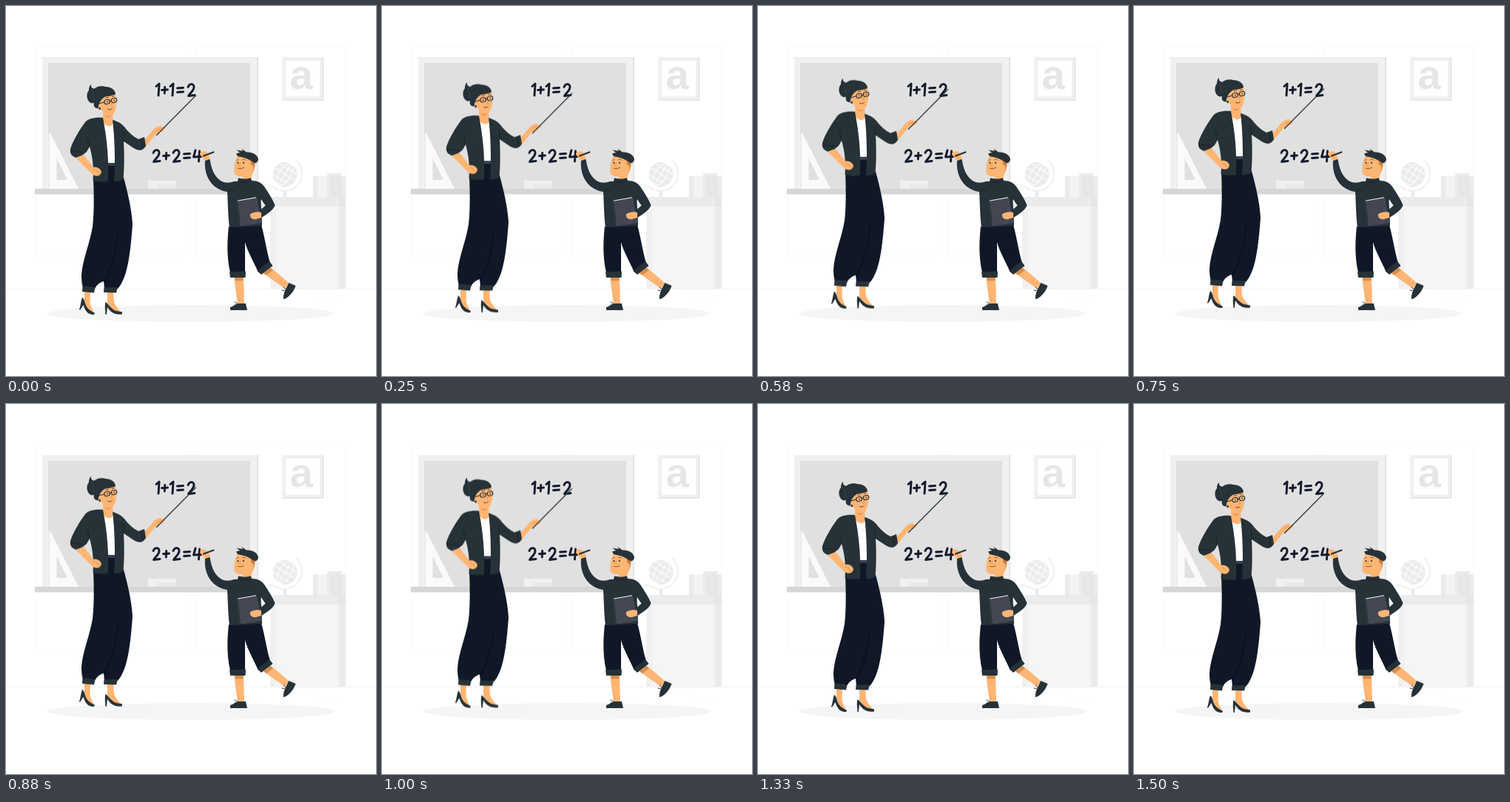
These frames come from a looping animation (500x500 px, 1.54 s). An HTML page without scripts:

```html
<!DOCTYPE html>
<html lang="en">
<head>
<meta charset="utf-8">
<title>Maths lesson</title>
<style>
  html, body { margin: 0; width: 100%; height: 100%; overflow: hidden; background: #fff; }
  svg { display: block; width: 100%; height: 100%; }
  .dark { fill: #263238; }
  .navy { fill: #101828; }
  .skin { fill: #ffb573; }
  .shade { fill: #d58f51; }
  .line { fill: none; stroke: #263238; stroke-linecap: round; stroke-linejoin: round; }
  .fold { fill: none; stroke: #141d22; stroke-width: .8; }
  .crease { fill: none; stroke: #d58f51; stroke-width: .8; stroke-linecap: round; }
  .ink { fill: none; stroke: #141a2c; stroke-width: 2.9; stroke-linecap: round; stroke-linejoin: round; }
  .teacher { animation: float 770ms cubic-bezier(.37, 0, .63, 1) -40ms infinite alternate; }
  @keyframes float { to { transform: translateY(-9px); } }
</style>
</head>
<body>
<svg viewBox="0 0 500 500" role="img" aria-label="A teacher points at 1+1=2 while a pupil writes 2+2=4">
  <defs>
    <path id="one" d="M0 4.500 4 1 3 17"/>
    <path id="two" d="M0 4.500C2 -1 8.500 -.500 8 5 7.500 10 2 13 .500 16.500L9 15.500"/>
    <path id="plus" d="M0 4.500 8 4M4.200 .500 3.800 9"/>
    <path id="equals" d="M0 .500 8 0M0 6 8 5.500"/>
    <rect id="lens" x="-3.800" y="-2.800" width="7.600" height="5.600" rx="2.600" transform="rotate(-12)"/>
  </defs>

  <!-- Room -->
  <g fill="none" stroke="#f9f9f9">
    <rect x="39.500" y="55.500" width="203" height="282" rx="3"/>
    <rect x="255.500" y="55.500" width="203" height="282" rx="3"/>
  </g>
  <path d="M0 382.500H500" stroke="#f2f2f2"/>
  <path d="M390 389.500H416M416 398.500H448" stroke="#f9f9f9"/>

  <!-- Board -->
  <path fill="#e6e6e6" d="M49 69H341V247H49z"/>
  <path fill="#f0f0f0" d="M49 69H339V247H49z"/>
  <path fill="#e0e0e0" d="M57 77H330V247H57z"/>
  <path fill="#fafafa" fill-rule="evenodd" d="M59 170V247H98zM68.500 206V235H83z"/>
  <path fill="#ebebeb" d="M59 170 57 174V247H59z"/>
  <path fill="#f0f0f0" d="M192 236H230V247H192z"/>
  <path fill="#e9e9e9" d="M204 241H230V247H204z"/>
  <path fill="#d6d6d6" d="M39 247H341V254.500H39z"/>

  <!-- Framed letter -->
  <path fill="#e6e6e6" d="M373 69H429.500V128H373z"/>
  <path fill="#f0f0f0" d="M373 69H427.500V126H373z"/>
  <path fill="#fff" d="M378 74H424V122.500H378z"/>
  <text x="383.500" y="112" font-family="Liberation Sans, Arial, sans-serif" font-weight="700" font-size="56" fill="#e6e6e6">a</text>

  <!-- Globe, books and cabinet -->
  <circle cx="377" cy="227.500" r="16.500" fill="#ebebeb"/>
  <g fill="none" stroke="#fff" transform="rotate(32 377 227.500)">
    <ellipse cx="377" cy="227.500" rx="8" ry="16.500"/>
    <path d="M377 211V244M360 227.500H394M363 219H391M363 236H391"/>
  </g>
  <path fill="none" stroke="#ebebeb" stroke-width="1.500" d="M393 209A23.500 23.500 0 1 1 359 243"/>
  <path fill="#ebebeb" d="M374.500 250H379V258H374.500z"/>
  <path fill="#ebebeb" d="M415 230H428V258H415zM434 226H453V230H459V258H434z"/>
  <path fill="#f3f3f3" d="M421 230H428V258H421zM428 230H434V258H428z"/>
  <path fill="#e6e6e6" d="M434 230H453V258H439V231H434z"/>
  <path fill="#ebebeb" d="M357 258H459V382H357z"/>
  <path fill="#f0f0f0" d="M357 271H365V382H357z"/>
  <path fill="#f5f5f5" d="M365 271H450V382H365z"/>
  <path fill="#e6e6e6" d="M357 258H459V271H357z"/>
  <path fill="#ebebeb" d="M357 258H450V271H357z"/>

  <ellipse cx="250" cy="415.500" rx="194" ry="11.500" fill="#f5f5f5"/>

  <g class="ink">
    <use href="#one" x="203" y="104"/>
    <use href="#plus" x="210.500" y="109"/>
    <use href="#one" x="222" y="104"/>
    <use href="#equals" x="231.500" y="110.500"/>
    <use href="#two" x="246" y="105"/>
    <use href="#two" x="199" y="194"/>
    <use href="#plus" x="212.500" y="198"/>
    <use href="#two" x="226" y="194"/>
    <use href="#equals" x="240.500" y="199.500"/>
    <path d="M256 195 253.500 204 264 203.500M261.500 196 260.500 210"/>
  </g>

  <!-- Pupil -->
  <g>
    <path class="skin" d="M308 365H321L322 404H313zM346 360 356 352 382 374 377 382z"/>
    <path class="shade" d="M309 366H320.500V371L310 371.500zM348 361 357 354 361 357 352 364z"/>
    <path class="dark" d="M303 407C308 406 310 402 315 402L324 402 326 411H303zM375 396C374 389 379 381 382 374L391.500 378C389 386 382 394 376 396z"/>
    <path class="line" stroke-width=".9" d="M314 403 309 400M314 404 309 404M378 383 375 380M377 385 373 384"/>
    <path class="navy" d="M301 298 345 296C350 313 352 331 357 347L341 360C334 344 326 331 323 319L323 360 303 360C298 340 299 315 301 298z"/>
    <path class="dark" d="M302 359.500 324 358.500 323.500 367 303 367zM339.500 358 356 345 360.500 351 345 363z"/>

    <path class="skin" d="M270 210C268 207 264 204 262.500 201 261 197 267 195 271 198 275 200 276 205 275 209z"/>
    <path class="line" stroke-width="2.200" d="M267 202.500 280.500 197.500"/>
    <path class="skin" d="M313 202C309 209 308 219 308.500 225 310 230 316 231 320 230L319 236H331L332 229C336 224 337 212 335 207z"/>
    <path class="dark" d="M269 209 275.500 207C277 217 280 229 290 236 296 240 303 239 308 237L313 237 314 232.500C320 234 326 234 331 232.500L332 236C342 236 347 240 351 247 357 256 361 263 363.500 269 362 276 351 282 344 287L340 279 350 270 345 261 346 297 302 299C300 285 300 268 299 251 283 249 267 235 269 209z"/>
    <path fill="#fff" d="M344.500 262 350.500 269.500 345 274z"/>
    <path fill="#434754" d="M312 264 339 259.500 345.500 294 316 298z"/>
    <path fill="none" stroke="#fff" d="M313 263.200 338 258.800"/>
    <path class="line" d="M313 264 316.500 298 345 294"/>
    <path class="skin" d="M345 279C340 277 333 279 330 281 329 286 333 289 338 288L345 286z"/>
    <path class="fold" d="M302 247C304 249 307 250 309 250M314 237C320 239 327 238 331 237"/>

    <path fill="#c87a3d" d="M330 208 336 211C337 215 336 220 333.500 222 331 218 332 212 330 208z"/>
    <ellipse class="skin" cx="332.500" cy="218" rx="2.300" ry="3.300"/>
    <path class="dark" d="M311 199.500 316 198 311.500 194.500 320 196 318.500 193 325 197.500C333 197 340 201 341 207 340.500 211 338 213 335.500 212 329 207 321 204 313 203z"/>
    <path class="dark" d="M312.600 212a.9 1.200 0 1 0 1.800 0a.9 1.200 0 1 0-1.800 0M320.200 212a.9 1.200 0 1 0 1.800 0a.9 1.200 0 1 0-1.800 0"/>
    <path class="line" stroke-width=".7" d="M311.800 208.500 314 207.500M320 207.500 323.500 208M314 219.500C317 220.500 320 219.500 321.500 218"/>
    <path class="crease" d="M316.500 212 314.800 216 317 216.500"/>
  </g>

  <!-- Teacher -->
  <g class="teacher">
    <path class="skin" d="M106 385H114L113.500 401C115 408 118 412 119 415 110 414 106 405 106 398zM137 385H145L146 400C149 407 153 411 156 414 144 414 137 406 137 400z"/>
    <path class="dark" d="M103 394C105 395 106 398 107 402 109 409 114 412 119.500 414.500L119.500 417C111 418 107 412 104.500 404L100 411 99 410C101 405 101 399 103 394zM134.500 400C138 402 142 410 149 412L157 413.500V416.500C146 418 141 413 137 407L135.800 417H134.500C134 411 133 405 134.500 400z"/>
    <path class="navy" d="M118 232C119 260 119 281 117 298 113 322 103 344 102 364 102 372 103 377 104 380L120 382C123 376 128 373 132 372L133 382H151C164 368 168 336 171 295 170 275 164 250 159 232L147 211H137z"/>
    <path fill="#0b111d" d="M152 286C153 315 149 345 134 374L132 372C146 346 151 318 152 286z"/>
    <path fill="#374050" d="M137 211H147V216H138z"/>
    <path class="dark" d="M103.500 378 120.500 380 119 387.500 103 386zM132.500 380.500 151 380 149 387.500 132 387z"/>

    <path class="skin" d="M186 182 196 171C199 166 203 163 209 161.500 211 162 210 163 209 164 213 163 216 164 215 166 212 170 206 171 202 174L188 191z"/>
    <path fill="#fff" d="M131 157 145 158 147 212H136z"/>
    <path class="skin" d="M131 140 144 143 145 158C143 164 136 164 131 157z"/>
    <path class="shade" d="M133 146C136 149 140 149 143 147 141 151 136 152 133 146z"/>
    <path class="dark" d="M131 151C120 150 111 152 107 157 99 168 91 181 87 193 86 200 89 204 98 206L109 197 113 190C117 204 119 219 117.500 236 124 238 131 238 138 237 139 207 137 183 131 151zM144 154C152 156 158 160 162 166 167 172 173 177 179 180L187 177 189 189C184 198 177 195 171 191L159 183C160 200 160 219 158.500 234 154 237 149 237 146 237 148 209 147 179 144 154z"/>
    <path class="fold" d="M113 190 110 177M159 183 158 171M89 196 104 198M183 180 185 192"/>
    <path class="skin" d="M94 205 105 201 118 218C123 217 128 220 129 224 128 230 123 231 117 228z"/>
    <path class="crease" d="M119 221 124 224 126 227M204 168 210 165"/>
    <path class="line" stroke-width="1.200" d="M203.500 174.500 256.500 121"/>

    <path class="skin" d="M125 127C130 117 145 114 148.500 121 150.500 130 149 145 142 148.500 137 150 132 147 130 141 124 142 122 133 125 127z"/>
    <path class="dark" d="M114.500 106C112 109 112 112 112 114 108 118 109 127 113 130 115 132 118 131 119 131 118 134 119 137 122 138 124 139 125 138 125 136 125 131 129 126 133 123 138 121 144 122 148 119 148 113 141 109 134 109 129 107 122 109 119 112L115.500 110z"/>
    <path class="line" style="stroke:#46535a" stroke-width=".6" d="M115 113C119 118 117 124 120 127"/>
    <circle class="dark" cx="126.500" cy="138.500" r="1.400"/>
    <g class="line" stroke-width="1.200">
      <use href="#lens" x="136.500" y="129.500"/>
      <use href="#lens" x="146" y="127.500"/>
      <path d="M132.800 130 122 133M140 128.500 142.500 128"/>
    </g>
    <path class="line" stroke-width=".8" d="M135 124.300 138.500 123.200M143.500 122.300 146 122M137.500 139.500C140 140.500 142 140 143.500 138.500"/>
    <path class="dark" d="M136 129.500a.8 1.100 0 1 0 1.600 0a.8 1.100 0 1 0-1.600 0M145.300 127.500a.8 1.100 0 1 0 1.600 0a.8 1.100 0 1 0-1.600 0"/>
    <path class="crease" d="M142 131 143.500 134.500 141.500 135"/>
  </g>
</svg>
</body>
</html>
```
